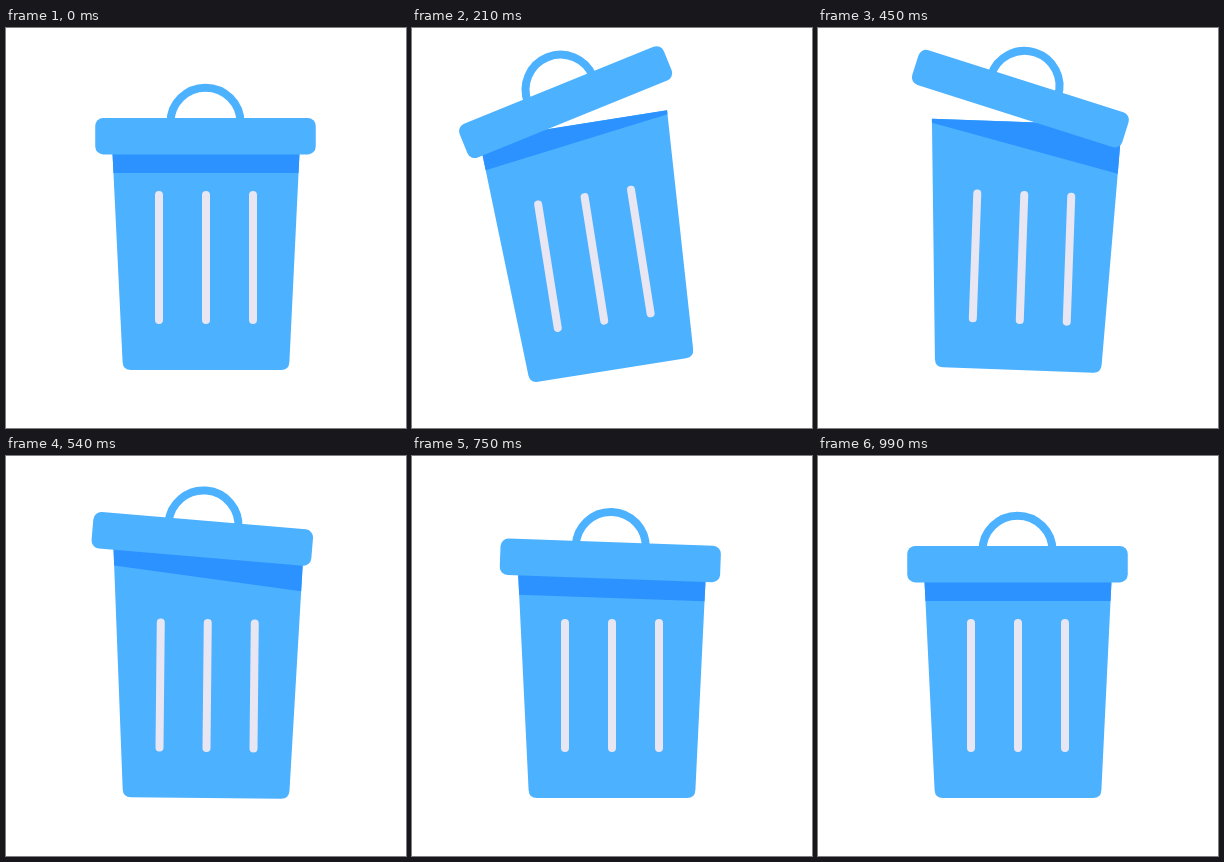
An HTML page for the animation above (2020 ms loop, 400 px wide and 400 px high).

```html
<!DOCTYPE html>
<html lang="en">
<head>
<meta charset="utf-8">
<title>Trash can</title>
<style>
  html, body { margin: 0; width: 100%; height: 100%; overflow: hidden; background: #fff; }
  svg { display: block; width: 100%; height: 100%; }
</style>
</head>
<body>
<svg viewBox="0 0 400 400">
  <g id="can" fill="#4cb1ff">
    <path d="M105 94H295L283.4 334Q283 342 275 342H125Q117 342 116.6 334Z"/>
    <path id="shade" fill="#2b92ff"/>
    <path d="M153 167V292M200 167V292M247 167V292" stroke="#e9e6f3" stroke-width="8" stroke-linecap="round"/>
    <g id="lid">
      <path d="M-35 -13.5A35 35 0 0 1 35 -13.5" fill="none" stroke="#4cb1ff" stroke-width="8"/>
      <rect x="-110.25" y="-18.25" width="220.5" height="36.5" rx="8"/>
    </g>
  </g>
</svg>
<script>
const LOOP = 2020, STEP = 30, END = 990;
const [can, shade, lid] = ["can", "shade", "lid"].map(id => document.getElementById(id));

const smooth = u => u * u * (3 - 2 * u);

// Eases through [time, value] poses; the last move settles more gently.
const swing = (...poses) => t => {
  const next = poses.findIndex(([time]) => time > t);
  if (next < 0) return poses[poses.length - 1][1];
  const [t0, from] = poses[next - 1], [t1, to] = poses[next];
  const left = 1 - smooth((t - t0) / (t1 - t0));
  return to + (from - to) * left ** (next === poses.length - 1 ? 2 : 1);
};

const canTurn = swing([0, 0], [185, -10], [335, 3.5], [700, 0]);
const lidTurn = swing([0, 0], [210, -13.1], [440, 15.8], [610, -2.5], [750, 2], [END, 0]);
const lidLift = swing([0, 0], [300, 48.5], [END, 0]);
const lidShift = swing([0, 0], [210, -3.4], [330, 1], [450, -6.8], [END, 0]);

// Lower corner of the shade: it rises with the lid, but stays inside the can.
function shadeCorner(side, rise) {
  const y = 145 - Math.min(47, rise);
  return `${200 + side * (95 - (y - 94) * 0.0484)} ${y}`;
}

function draw(now) {
  const t = Math.min(END, Math.floor(now % LOOP / STEP) * STEP);
  const lift = lidLift(t), tilt = lidTurn(Math.max(0, t - 15));
  can.setAttribute("transform", `rotate(${canTurn(t)} 200 342)`);
  lid.setAttribute("transform",
    `translate(${199.5 + lidShift(t)} ${108.2 - lift}) rotate(${lidTurn(t)})`);
  shade.setAttribute("d", `M105 94H295L${shadeCorner(1, lift - 2.2 * tilt)}`
    + `L${shadeCorner(-1, lift + 1.4 * tilt)}Z`);
}

const start = performance.now();
function loop() {
  draw(performance.now() - start);
  requestAnimationFrame(loop);
}
loop();
</script>
</body>
</html>
```
